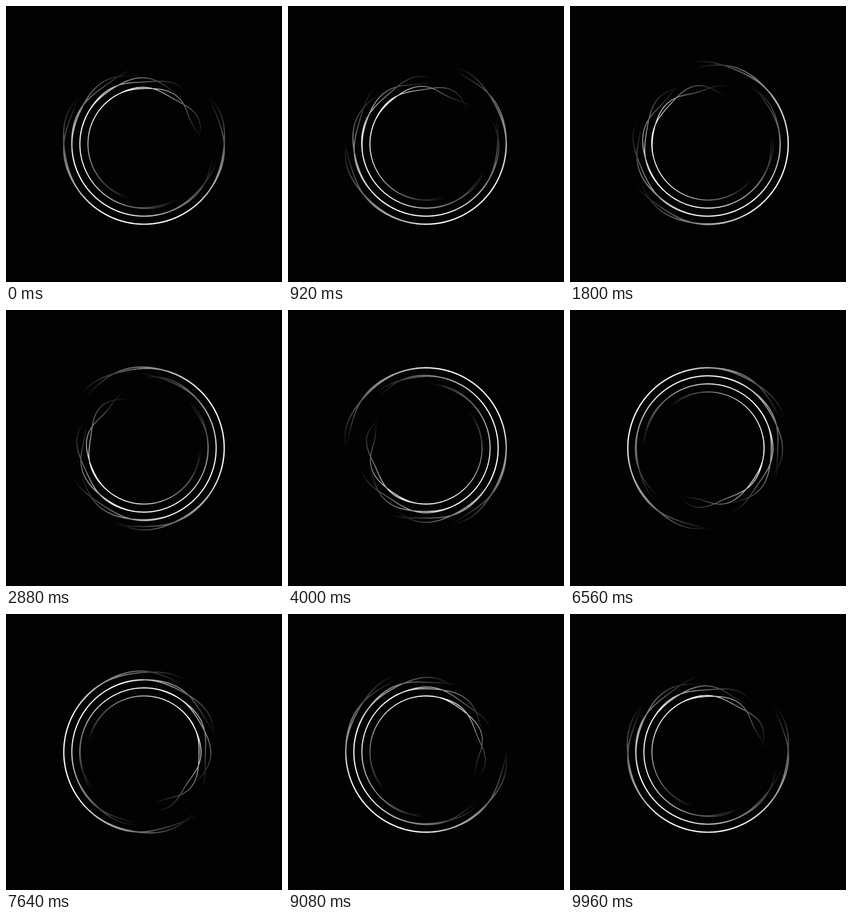
An HTML page with a canvas that plays this animation: 480 px wide and 480 px high, repeating every 10 s.

```html
<!DOCTYPE html>
<html lang="en">
<head>
<meta charset="utf-8">
<title>Woven rings</title>
<style>
  html, body { margin: 0; height: 100%; overflow: hidden; background: #020202; }
  canvas { display: block; }
</style>
</head>
<body>
<canvas id="stage" width="480" height="480"></canvas>
<script>
const ctx = document.getElementById('stage').getContext('2d');
const LOOP = 10000, RINGS = 4, CENTER = 240, REACH = 126;
const rad = deg => deg * Math.PI / 180;

// Opacity of a ring, by degrees from the middle of its arc
const opacity = deg => Math.min(1, Math.max(0, (REACH - Math.abs(deg)) / 100));

// Fades the arc out around its middle angle
function arcFade(middle) {
  const fade = ctx.createConicGradient(rad(middle - 180), CENTER, CENTER);
  for (let deg = -180; deg <= 180; deg += 4) {
    fade.addColorStop((deg + 180) / 360, `rgba(255,255,255,${opacity(deg).toFixed(3)})`);
  }
  return fade;
}

function addStrand(ring, side, middle, t) {
  const radius = 139.5 - 14 * ring;
  for (let deg = -REACH; deg <= REACH + 6; deg++) {
    const lag = deg + 12 * ring;
    const swing = 8.5 * Math.sin(rad(lag / 2)) ** 4;
    const r = radius + side * swing * Math.sin(rad(5 * (lag - 90) - 3600 * t));
    const angle = rad(middle + deg);
    const point = [CENTER + r * Math.cos(angle), CENTER + r * Math.sin(angle)];
    if (deg === -REACH) ctx.moveTo(...point);
    else ctx.lineTo(...point);
  }
}

// Both strands share one path, so they do not brighten where they overlap
function drawRing(ring, t) {
  const middle = 90 + 45 * ring - 360 * t;
  ctx.strokeStyle = arcFade(middle + 1.5 * ring);
  ctx.lineWidth = 2.2 - 0.2 * ring;
  ctx.beginPath();
  addStrand(ring, 1, middle, t);
  addStrand(ring, -1, middle, t);
  ctx.stroke();
}

function draw() {
  const t = performance.now() % LOOP / LOOP;
  ctx.clearRect(0, 0, 480, 480);
  for (let ring = 0; ring < RINGS; ring++) drawRing(ring, t);
  requestAnimationFrame(draw);
}
draw();
</script>
</body>
</html>
```
